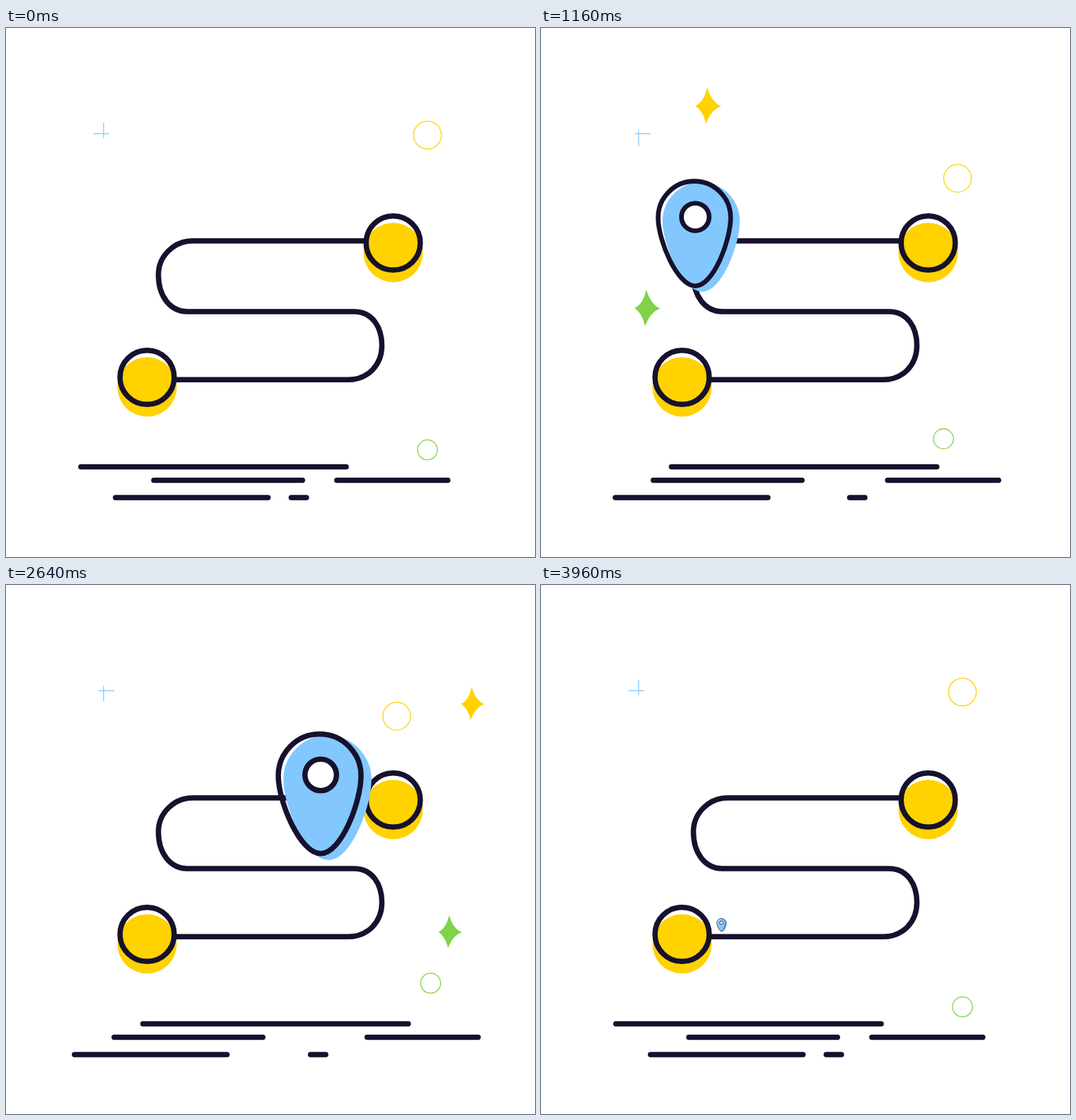
These frames come from a looping animation (748 px wide and 748 px high, 4000 ms). An HTML page:

```html
<!DOCTYPE html>
<html lang="en">
<head>
<meta charset="utf-8">
<title>Route</title>
<style>
  html, body { margin: 0; width: 100%; height: 100%; overflow: hidden; background: #fff; }
  svg { display: block; width: 100%; height: 100%; }
  .ink { fill: none; stroke: #16112d; stroke-width: 7.5; }
  .round { stroke-linecap: round; }
  .thin { fill: none; stroke-width: 1.3; }
</style>
</head>
<body>
<svg viewBox="0 0 748 748">
  <defs>
    <path id="drop" d="M-.5-186.7C-33-186.7-59-160-59-128C-59-91-28-17.7 1-17.7C30-17.7 58-91 58-128C58-160 32-186.7-.5-186.7Z"/>
    <path id="star" d="M-1-23.5Q5-4 17 .5Q4 5-2.5 23Q-6 7-16 0Q-5-5-1-23.5Z"/>
  </defs>
  <g class="thin">
    <path id="plusV" d="M138-11V11" stroke="#82c8ff"/>
    <path id="plusH" d="M-11 149.5H11" stroke="#82c8ff"/>
    <circle id="yellowRing" r="19.6" stroke="#ffd200"/>
    <circle id="greenRing" r="14.1" stroke="#7ed348"/>
  </g>
  <path class="ink" d="M509 301H264C238 301 215.5 322 215.5 349C215.5 378 231 401 257 401H492C518 401 531.5 423 531.5 449C531.5 476 512 497.3 484 497.3H240"/>
  <g id="ends"></g>
  <g id="stars"></g>
  <g id="pin">
    <use href="#drop" x="11" y="5.5" fill="#82c8ff" stroke="#82c8ff" stroke-width="7.5"/>
    <use href="#drop" class="ink"/>
    <circle class="ink" cx="1" cy="-129" r="22.3" style="fill:#fff"/>
  </g>
  <g id="ground" class="ink round"></g>
</svg>
<script>
const NS = 'http://www.w3.org/2000/svg';
const LOOP = 4000, CYCLE = 3960, HALF = CYCLE / 2;
const YELLOW = '#ffd200', GREEN = '#7ed348';
const $ = id => document.getElementById(id);

function add(parent, tag, attrs) {
  const el = document.createElementNS(NS, tag);
  for (const k in attrs) el.setAttribute(k, attrs[k]);
  return parent.appendChild(el);
}

function place(el, x, y, s = 1) {
  el.setAttribute('transform', `translate(${x} ${y}) scale(${s})`);
  el.setAttribute('visibility', s > 0.001 ? 'visible' : 'hidden');
}

function orbit(el, cx, cy, r, deg) {
  const a = deg * Math.PI / 180;
  place(el, cx + r * Math.cos(a), cy + r * Math.sin(a));
}

const ease = u => (1 - Math.cos(Math.PI * Math.max(0, Math.min(1, u)))) / 2;

// Damped spring from 0 to 1, u in ms
const spring = u => u <= 0 ? 0 : 1 - Math.cos(Math.PI * u / 130) * Math.exp(-0.014 * u);

// Springs in at `start` and, mirrored in time, out at `end`
const pop = (t, start, end) => spring(t - start) * spring(end - t);

// Eases 0 -> 1 after a delay and back by the end of the cycle
function swing(t, cycle, span, delay = 0) {
  const p = t % cycle;
  return ease((p - delay) / span) * ease((cycle - p) / span);
}

for (const [cx, cy] of [[547.5, 304], [199.5, 494]]) {
  add($('ends'), 'circle', { cx, cy: cy + 13.5, r: 42, fill: YELLOW });
  add($('ends'), 'circle', { cx, cy, r: 38.3, class: 'ink' });
}

const stops = [[466, 295.5], [217.3, 380.3], [444, 397.5], [255, 491.3]];

const stars = [
  { x: 236, y: 110, fill: YELLOW, start: 450 },
  { x: 150, y: 396, fill: GREEN, start: 450 },
  { x: 659.5, y: 168, fill: YELLOW, start: 2170 },
  { x: 627.5, y: 490.5, fill: GREEN, start: 2174 }
];
for (const s of stars) s.el = add($('stars'), 'use', { href: '#star', fill: s.fill });

const ground = [
  { x: 105.8, y: 620.4, len: 375.2, shift: 94, cycle: CYCLE, span: 1580 },
  { x: 209, y: 639.4, len: 210.2, shift: -60, cycle: CYCLE, span: 1580 },
  { x: 467.8, y: 639.4, len: 156.9, shift: 45, cycle: CYCLE, span: 1530, delay: 400 },
  { x: 154.8, y: 663.9, len: 215.7, shift: -72, cycle: CYCLE, span: 1860 },
  { x: 403.3, y: 663.9, len: 21.5, shift: 35, cycle: HALF, span: 960 }
];
for (const g of ground) g.el = add($('ground'), 'path', { d: `M${g.x} ${g.y}h${g.len}` });

function draw(t) {
  const turn = 360 * t / CYCLE;
  orbit($('yellowRing'), 584, 181, 31.9, -67.9 - 2 * turn);
  orbit($('greenRing'), 588.5, 578.5, 19.55, 67.5 + turn);

  const sway = swing(t, HALF, HALF / 2);
  place($('plusV'), 0, 144.8 + 12 * sway);
  place($('plusH'), 134.6 + 10 * sway, 0);

  const [x, y] = stops[Math.floor(t / 1000)];
  place($('pin'), x, y, pop(t % 1000, 107, 968));
  for (const s of stars) place(s.el, s.x, s.y, pop(t, s.start, s.start + 790));
  for (const g of ground) place(g.el, g.shift * swing(t, g.cycle, g.span, g.delay), 0);
}

function tick() {
  draw(performance.now() % LOOP);
  requestAnimationFrame(tick);
}
draw(0);
requestAnimationFrame(tick);
</script>
</body>
</html>
```
